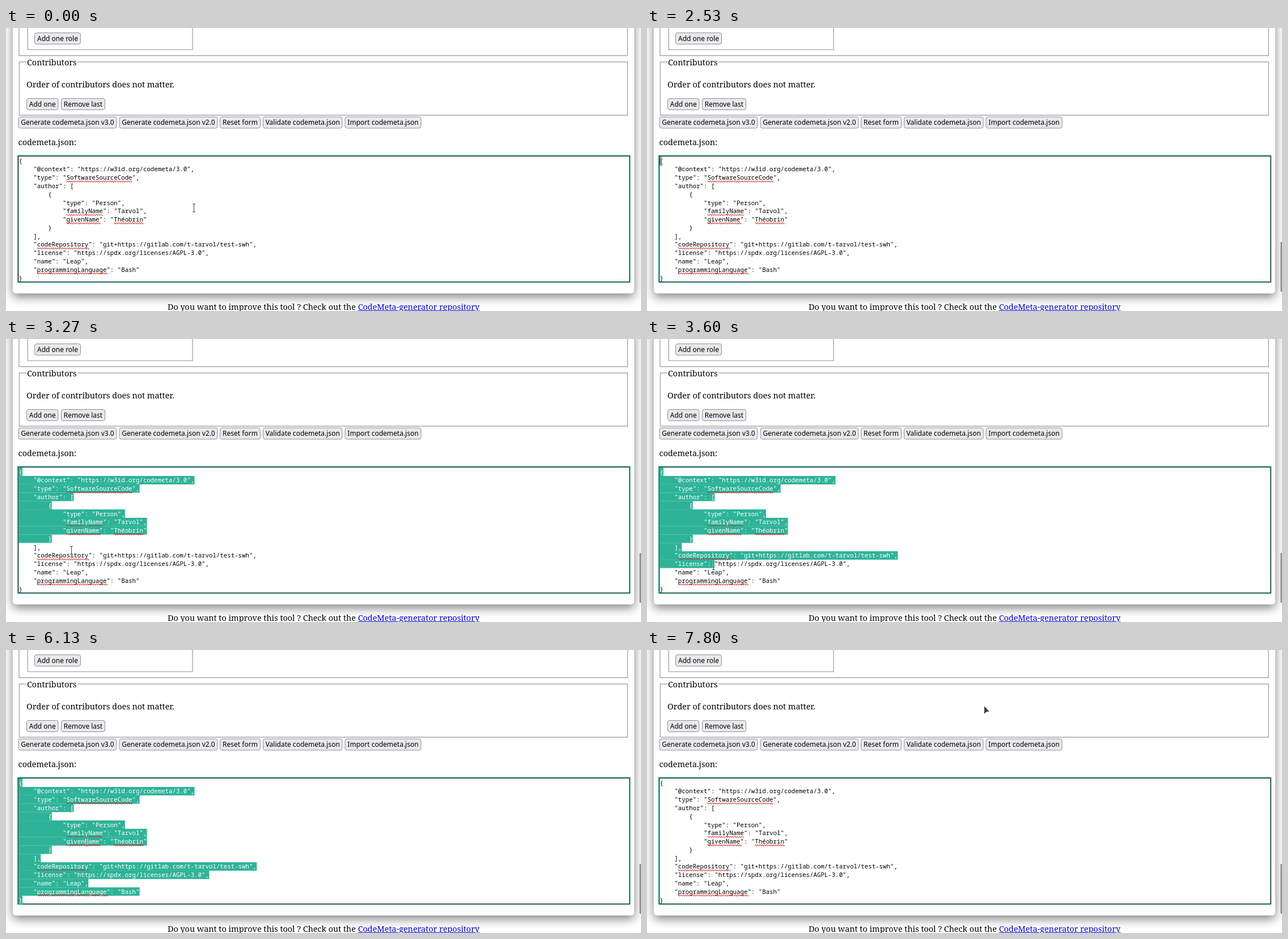
An HTML page for the animation above (8000 ms loop, 1120x500 px).

```html
<!DOCTYPE html>
<html lang="en">
<head>
<meta charset="utf-8">
<title>codemeta.json form</title>
<style>
  html, body { margin: 0; width: 100%; height: 100%; overflow: hidden; background: #fff; }
  svg { display: block; }
  .card { fill: #fff; filter: drop-shadow(0 6px 9px rgba(0, 0, 0, .5)); }
  .fieldset { fill: none; stroke: #a8a8a8; stroke-width: 1.4; }
  .serif { font: 14.4px "Noto Serif", serif; }
  .link { fill: #00e; text-decoration: underline; }
  .button rect { fill: #e9e9ed; stroke: #8f8f9d; }
  .button text { font: 12px "Noto Sans", sans-serif; text-anchor: middle; }
  .code { font: 10.76px "Noto Sans Mono", monospace; }
  .selected { fill: #fff; }
  .squiggle { fill: none; stroke: #e00000; stroke-width: 1; }
</style>
</head>
<body>
<svg id="stage" width="1120" height="500" viewBox="0 0 1120 500">
  <rect class="card" x="12" y="-60" width="1096" height="529" rx="6"/>
  <path class="fieldset" d="M38.3 -5V38.4H329V-5M23 -5V48.8H1096.3V-5M36 60H23.4V154H1096.3V60H126"/>
  <g class="serif">
    <text x="37" y="65.5">Contributors</text>
    <text x="36" y="105">Order of contributors does not matter.</text>
    <text x="21.6" y="206.5">codemeta.json:</text>
    <text x="560" y="498" text-anchor="middle">Do you want to improve this tool ? Check out the <tspan class="link">CodeMeta-generator repository</tspan></text>
  </g>
  <g id="buttons"></g>
  <rect x="20" y="224.6" width="1081.4" height="225.4" rx="1" fill="#2eb398"/>
  <rect x="21.4" y="226" width="1078.8" height="223" fill="#1c1c1c"/>
  <rect x="22.4" y="227" width="1076.8" height="221" fill="#fff"/>
  <g id="code" class="code"></g>
  <rect id="caret" width="1" height="15"/>
  <rect id="scrollbar" x="1117.4" y="378" width="4" height="88" rx="1.5" fill="#8f8f8f"/>
  <g id="beam" fill="none">
    <path d="M-2.5 -7H2.5M0 -7V7M-2.5 7H2.5" stroke="#fff" stroke-opacity=".7" stroke-width="2.4"/>
    <path d="M-2.5 -7H2.5M0 -7V7M-2.5 7H2.5" stroke="#444"/>
  </g>
  <path id="arrow" d="M0 0V15L4 11.3L9.6 10.2Z" fill="#3c3c3c" stroke="#fff" stroke-width=".7"/>
</svg>
<script>
const LOOP = 8000, STEP = 200 / 3;
const LEFT = 22.6, TOP = 227.2, COLUMN = 6.456, ROW = 14.78;
const $ = id => document.getElementById(id);

const lines = `{
    "@context": "https://w3id.org/codemeta/3.0",
    "type": "SoftwareSourceCode",
    "author": [
        {
            "type": "Person",
            "familyName": "Tarvol",
            "givenName": "Théobrin"
        }
    ],
    "codeRepository": "git+https://gitlab.com/t-tarvol/test-swh",
    "license": "https://spdx.org/licenses/AGPL-3.0",
    "name": "Leap",
    "programmingLanguage": "Bash"
}`.split("\n");
const misspelled = /SoftwareSourceCode|familyName|givenName|Théobrin|codeRepository|programmingLanguage/g;

function add(parent, tag, attributes, text = "") {
  const node = document.createElementNS("http://www.w3.org/2000/svg", tag);
  for (const [name, value] of Object.entries(attributes)) node.setAttribute(name, value);
  node.textContent = text;
  return parent.appendChild(node);
}

function addButton(label, x, y, width) {
  const group = add($("buttons"), "g", { class: "button" });
  add(group, "rect", { x: x + .5, y: y + .5, width: width - 1, height: 20, rx: 3.5 });
  add(group, "text", { x: x + width / 2, y: y + 14.8 }, label);
}
addButton("Add one role", 50, 8, 82);
addButton("Add one", 36, 124, 56.5);
addButton("Remove last", 97, 124, 78);
addButton("Generate codemeta.json v3.0", 21.5, 156.5, 174);
addButton("Generate codemeta.json v2.0", 199.5, 156.5, 174);
addButton("Reset form", 377, 156.5, 72);
addButton("Validate codemeta.json", 453, 156.5, 140.5);
addButton("Import codemeta.json", 597.5, 156.5, 135);

const keepSpaces = text => text.replaceAll(" ", "\u00a0");

const rows = lines.map((line, i) => {
  const top = TOP + i * ROW, y = top + 11.4;
  add($("code"), "text", { x: LEFT, y }, keepSpaces(line));
  const highlight = add($("code"), "rect", { x: 22.2, y: top, height: ROW + .1, fill: "#2eb398" });
  const selected = add($("code"), "text", { class: "selected", x: LEFT, y });
  for (const match of line.matchAll(misspelled)) {
    let path = `M${LEFT + match.index * COLUMN} ${y + 3}`;
    for (let x = 0; x < match[0].length * COLUMN - 2; x += 4) path += "q1 -2.6 2 0t2 0";
    add($("code"), "path", { class: "squiggle", d: path });
  }
  return { line, highlight, selected };
});

// Pointer stops: time, x, y
const stops = [
  [0, 331.5, 318], [667, 331.5, 318], [1533, 40, 236], [1733, 24, 238.5],
  [1933, 24, 238.5], [2133, 28, 247], [2200, 24, 235], [2533, 24.5, 235.3],
  [3000, 108, 338], [3200, 108, 338], [3267, 115.5, 373.5], [4067, 121, 445.5],
  [4200, 121, 447], [4333, 121, 447], [4533, 122, 443.5], [5200, 122, 443.5],
  [5267, 123, 444], [5600, 123, 444], [6133, 142.5, 339], [7133, 142.5, 339],
  [7800, 594.5, 98.5], [LOOP, 594.5, 98.5]
];

function pointerAt(t) {
  const next = Math.max(1, stops.findIndex(stop => stop[0] >= t));
  const [t0, x0, y0] = stops[next - 1], [t1, x1, y1] = stops[next];
  const p = (t - t0) / (t1 - t0), eased = p * p * (3 - 2 * p);
  return { x: x0 + (x1 - x0) * eased, y: y0 + (y1 - y0) * eased };
}

// The selection trails the pointer slightly and freezes once the drag ends.
function selectionEnd(t) {
  if (t < 2520 || t > 6720) return { row: 0, column: 0 };
  const { x, y } = pointerAt(Math.min(t, 4200) - 33);
  const row = Math.max(0, Math.min(lines.length - 1, Math.floor((y - TOP) / ROW)));
  return { row, column: Math.max(0, Math.round((x - LEFT) / COLUMN)) };
}

function showCaret(t, row, column, from, to) {
  if (t < from || t >= to) return;
  $("caret").setAttribute("x", LEFT + column * COLUMN - .5);
  $("caret").setAttribute("y", TOP + row * ROW);
  show("caret", true);
}

function show(id, visible) {
  $(id).style.display = visible ? "" : "none";
}

function draw(now) {
  const t = Math.floor((now % LOOP + 5) / STEP) * STEP;
  const end = selectionEnd(t);
  rows.forEach(({ line, highlight, selected }, i) => {
    const count = i < end.row ? line.length : i > end.row ? 0 : Math.min(end.column, line.length);
    highlight.setAttribute("width", count && count * COLUMN + LEFT - 22.2);
    selected.textContent = keepSpaces(line.slice(0, count));
  });

  show("caret", false);
  showCaret(t, 6, 35, 195, 795);
  showCaret(t, 0, 0, 2195, 2595);
  showCaret(t, 7, 19, 6725, 7325);
  show("scrollbar", t > 725);

  const { x, y } = pointerAt(t), inText = y > 225;
  show("beam", inText);
  show("arrow", !inText);
  $(inText ? "beam" : "arrow").setAttribute("transform", `translate(${x} ${y})`);
}

const start = performance.now();
function tick() {
  draw(performance.now() - start);
  requestAnimationFrame(tick);
}
tick();
</script>
</body>
</html>
```
